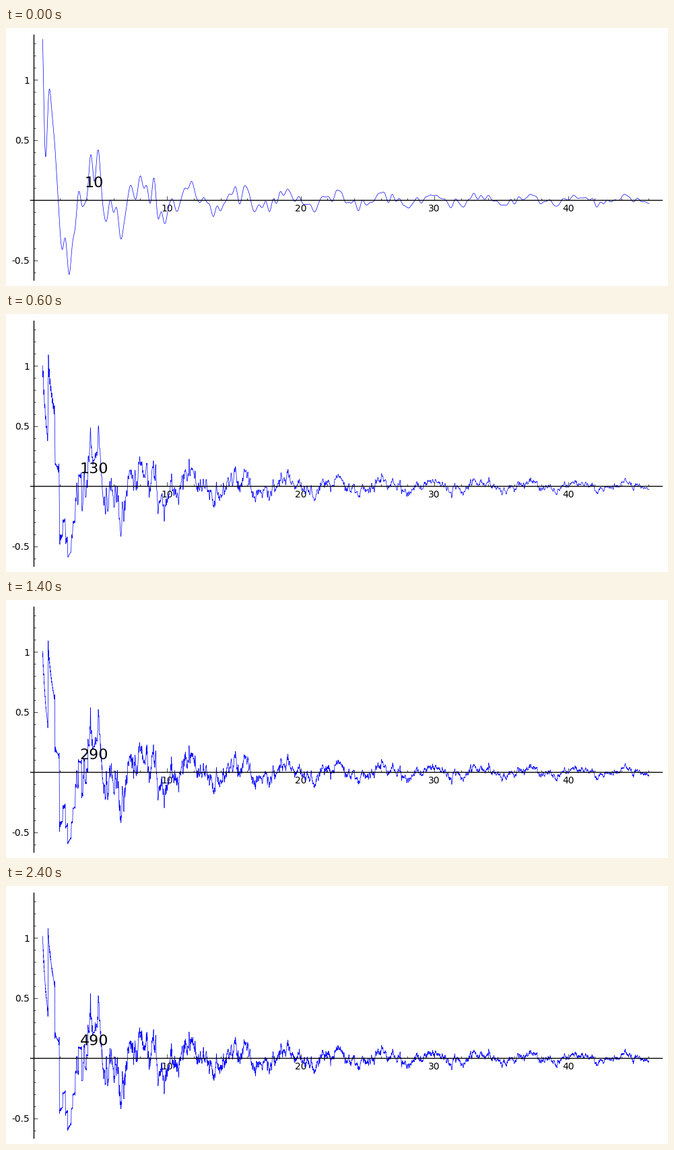
These frames come from a looping animation (983x384 px, 2600 ms). A matplotlib script:

```python
import numpy as np
import matplotlib.pyplot as plt
from matplotlib.animation import FuncAnimation
from matplotlib.ticker import FixedLocator, FuncFormatter, MultipleLocator

W, H, DPI = 983, 384, 100
LEFT, RIGHT, TOP, BOTTOM = 36, 974, 10, 375   # plot box, pixels
X0, Y0 = 40.6, 256.2                          # origin, pixels
X_UNIT, Y_UNIT = 19.85, 179.0                 # pixels per unit
FRAMES, INTERVAL = 13, 200
CONDUCTOR = 128


def dirichlet_coefficients(limit):
    """Coefficients of the L-series of y^2 = (x - 2)(x^2 + 4)."""
    a = np.zeros(limit + 1)
    a[1] = 1
    for p in range(3, limit + 1, 2):
        if any(p % d == 0 for d in range(3, int(p**0.5) + 1, 2)):
            continue
        x = np.arange(p, dtype=np.int64)
        roots = np.bincount(x * x % p, minlength=p)
        trace = p - roots[(x - 2) * (x * x + 4) % p].sum()
        for n in range(p, limit + 1, p):
            a[n] += trace * a[n // p]
            if n % (p * p) == 0:
                a[n] -= p * a[n // (p * p)]
    return a[1:]


def l_function_zeros(count):
    """Heights of the first zeros, from a Mellin transform along a tilted ray."""
    step, size, tilt = 0.006, 2**17, np.pi / 2 - 0.05
    a = dirichlet_coefficients(1500)
    n = np.arange(1, len(a) + 1)
    y = np.exp(np.arange(0, 7.5, step) + 1j * tilt)
    form = np.exp(-2 * np.pi / np.sqrt(CONDUCTOR) * np.outer(y, n)) @ a
    weights = form * y
    weights[0] /= 2
    dt = 2 * np.pi / (step * size)
    z = np.fft.ifft(weights, size).real[:int(320 / dt)]
    k = np.flatnonzero(z[:-1] * z[1:] < 0)
    return (dt * (k + z[k] / (z[k] - z[k + 1])))[:count]


counts = 10 + 40 * np.arange(FRAMES)
gammas = l_function_zeros(counts[-1])
u = np.linspace(np.log(2), 20 * np.log(10), 4500)
partial_sums = np.cumsum(2 * np.sin(np.outer(gammas, u)) / gammas[:, None], axis=0)
curves = partial_sums[counts - 1] / u

plt.rcParams["font.family"] = "DejaVu Sans"
fig = plt.figure(figsize=(W / DPI, H / DPI), dpi=DPI, facecolor="white")
ax = fig.add_axes([LEFT / W, 1 - BOTTOM / H, (RIGHT - LEFT) / W, (BOTTOM - TOP) / H])
ax.set_xlim((LEFT - X0) / X_UNIT, (RIGHT - X0) / X_UNIT)
ax.set_ylim((Y0 - BOTTOM) / Y_UNIT, (Y0 - TOP) / Y_UNIT)

for side in ("left", "bottom"):
    ax.spines[side].set_position(("data", 0))
    ax.spines[side].set_linewidth(1)
for side in ("right", "top"):
    ax.spines[side].set_visible(False)
ax.xaxis.set_major_locator(FixedLocator([10, 20, 30, 40]))
ax.yaxis.set_major_locator(FixedLocator([-0.5, 0.5, 1]))
ax.xaxis.set_minor_locator(MultipleLocator(2))
ax.yaxis.set_minor_locator(MultipleLocator(0.1))
for axis in (ax.xaxis, ax.yaxis):
    axis.set_major_formatter(FuncFormatter(lambda v, _: f"{v:g}"))
ax.tick_params(which="major", direction="in", length=4, width=0.5, pad=4, labelsize=10)
ax.tick_params(which="minor", direction="in", length=2, width=0.5)

line, = ax.plot([], [], color="blue", lw=0.5)
label = ax.text((131 - X0) / X_UNIT, (Y0 - 231) / Y_UNIT, "", fontsize=16,
                ha="center", va="center", color="black")


def update(i):
    line.set_data(u, curves[i])
    label.set_text(str(counts[i]))
    return line, label


anim = FuncAnimation(fig, update, frames=FRAMES, init_func=lambda: update(0),
                     interval=INTERVAL, repeat=True, repeat_delay=0)
plt.show()
```
